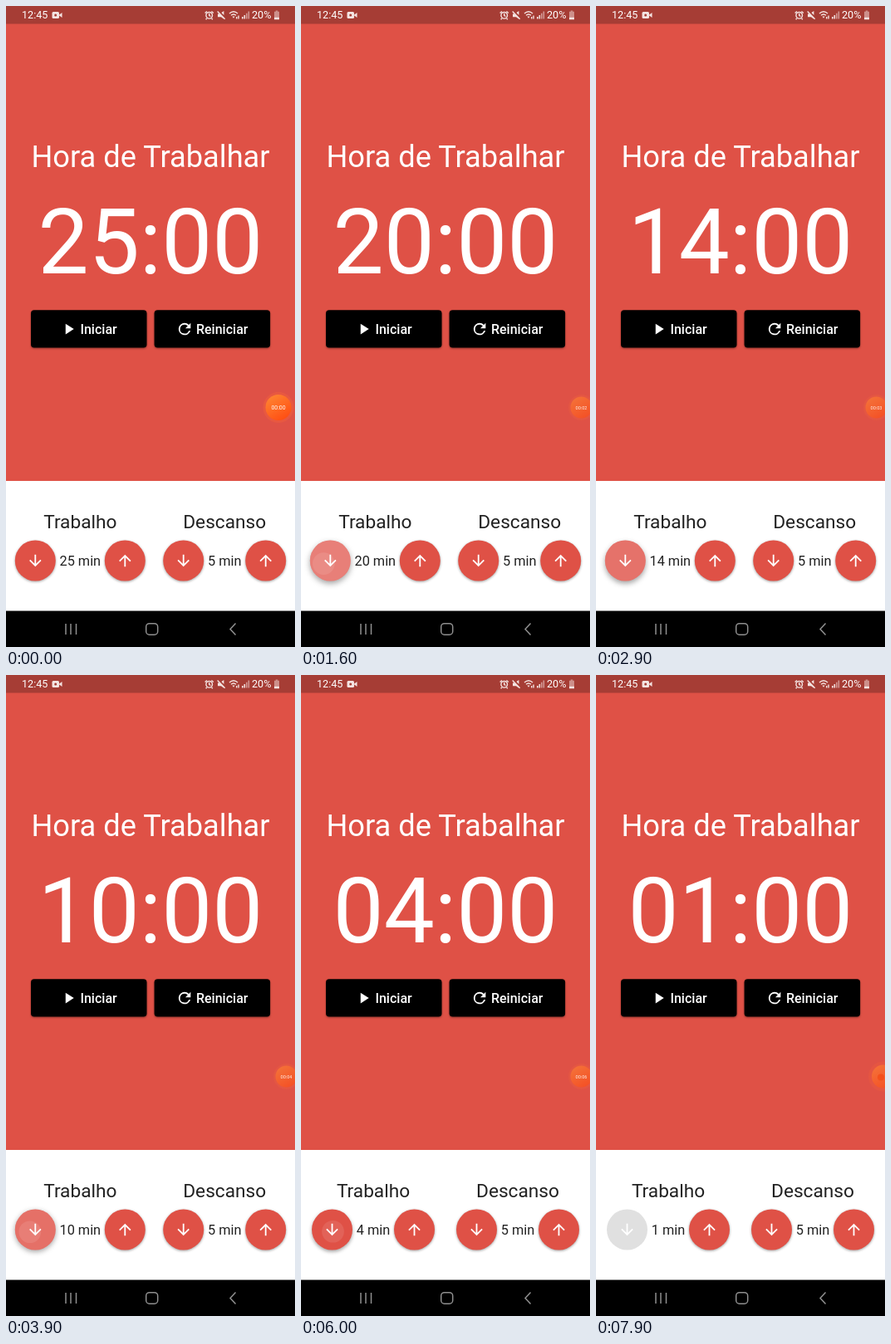
An HTML page for the animation above (8000 ms loop, 348 px wide and 772 px high).

```html
<!DOCTYPE html>
<html lang="pt">
<head>
<meta charset="utf-8">
<title>Hora de Trabalhar</title>
<style>
  html, body { margin: 0; width: 100%; height: 100%; overflow: hidden; background: #000; }
  svg { display: block; width: 100%; height: 100%; }
  text { font-family: Roboto, "Open Sans", sans-serif; fill: #fff; }
  .mid { text-anchor: middle; }
  .dark text { fill: #212121; text-anchor: middle; font-size: 16.31px; }
  .dark .head { font-size: 22.66px; }
  .btn { font-size: 16px; font-weight: 500; }
  .card { filter: drop-shadow(0 1.5px 1px rgba(0, 0, 0, .38)); }
  .disc { fill: #df5146; filter: drop-shadow(0 1.5px 1.4px rgba(0, 0, 0, .38)); }
  .nav { fill: none; stroke: #8f8f8f; stroke-width: 1.5; }
</style>
</head>
<body>
<svg viewBox="0 0 348 772">
  <defs>
    <linearGradient id="orange" x1="0" y1="0" x2=".6" y2="1">
      <stop offset="0" stop-color="#ff8a35"/>
      <stop offset="1" stop-color="#ff5014"/>
    </linearGradient>
    <clipPath id="round"><circle r="24.5"/></clipPath>
    <path id="down" d="M20 12l-1.41-1.41L13 16.17V4h-2v12.17l-5.58-5.59L4 12l8 8 8-8z"
      transform="scale(.906) translate(-12 -12)"/>
  </defs>

  <rect width="348" height="573" fill="#df5146"/>
  <rect width="348" height="21.5" fill="#a63d35"/>

  <g fill="#f4e4e2">
    <text x="19" y="15.4" font-size="12.6">12:45</text>
    <rect x="55.5" y="7" width="8.5" height="8" rx="1.5"/>
    <path d="M63.5 11l4-3v6z"/>
    <circle cx="59.7" cy="11" r="1.5" fill="#a63d35"/>
    <g fill="none" stroke="#f4e4e2" stroke-width="1.4">
      <circle cx="244.7" cy="11.3" r="3.8"/>
      <path d="M244.7 9v2.5l1.8 1M239.6 8.6l2.4-2.2M249.8 8.6l-2.4-2.2M241.8 15l-1.2 1.3M247.6 15l1.2 1.3"/>
      <path d="M254.6 6.4l9 9.4"/>
      <path d="M269 9q5-4.6 10 0M271 11.3q3-2.6 6 0"/>
    </g>
    <path d="M255 9.4h2.4l5 5.4v1l-3.4-2.6H255zM259.4 8l3-2v5z"/>
    <path d="M272.4 12.6h3.2L274 14.8zM277 13h1.4v2.6H277zM279.3 11.6h1.4v4h-1.4z"/>
    <path d="M284 13h1.6v2.6H284zM286.5 11h1.6v4.6h-1.6z"/>
    <path d="M289 8.7h1.6v6.9H289zM291.5 6.5h1.6v9.1h-1.6z" opacity=".55"/>
    <text x="296" y="15.4" font-size="12.6">20%</text>
    <path d="M324.7 5.6h2.6v1.2h1.7v9.4h-6V6.8h1.7z" opacity=".5"/>
    <path d="M323 13.8h6v2.4h-6z"/>
  </g>

  <text class="mid" x="174" y="194" font-size="36.25">Hora de Trabalhar</text>
  <text class="mid" id="clock" x="174" y="321.6" font-size="108.75">25:00</text>

  <g class="card">
    <rect x="30" y="366.3" width="139.5" height="45.3" rx="4"/>
    <rect x="178.6" y="366.3" width="139.5" height="45.3" rx="4"/>
  </g>
  <g fill="#fff">
    <path transform="translate(64.5 378.2) scale(.906)" d="M8 5v14l11-7z"/>
    <path transform="translate(204.2 378.2) scale(.906)" d="M17.65 6.35A7.96 7.96 0 0 0 12 4a8 8 0 1 0 7.73 10h-2.08A6 6 0 1 1 12 6c1.66 0 3.14.69 4.22 1.78L13 11h7V4z"/>
  </g>
  <text class="btn" x="89.4" y="394.7">Iniciar</text>
  <text class="btn" x="229" y="394.7">Reiniciar</text>

  <g id="badge">
    <circle id="halo" fill="#f0603c"/>
    <circle id="ball" fill="url(#orange)"/>
    <circle id="dot" r="4" cy="1" cx="-3" fill="#f4501c"/>
    <text class="mid" id="count">00:00</text>
  </g>

  <rect y="572" width="348" height="157" fill="#fff"/>
  <g class="dark" id="panel"></g>

  <rect y="728.5" width="348" height="43.5"/>
  <path class="nav" d="M72 744v13M78 744v13M84.500 744v13M276.500 743.500l-6.500 7 6.500 7"/>
  <rect class="nav" x="168.700" y="743.700" width="14" height="13.500" rx="4"/>
</svg>

<script>
const LOOP = 8000;
const START = 25;
// moments at which each tap takes one minute off
const TAPS = [
  800, 980, 1150, 1330, 1500, 1700, 1900, 2120, 2330, 2550, 2760, 3050,
  3250, 3500, 3750, 4000, 4300, 4600, 4900, 5300, 5650, 6100, 6500, 6870
];
const HOLD = 130;
const TICKS = [200, 1200, 2200, 3200, 4300, 5300, 6300];
// time, x, ball radius, halo radius, opacity, label size, label opacity
const BADGE = [
  [0, 328, 15.5, 18.5, 1, 6.9, 1],
  [900, 328, 15.5, 18.5, 1, 6.9, 1],
  [1250, 337.5, 13, 15.5, .6, 5.6, 1],
  [6450, 337.5, 13, 15.5, .6, 5.6, 1],
  [6750, 346, 14, 18, .6, 5.6, 0],
  [LOOP, 346, 14, 18, .6, 5.6, 0]
];
const NS = 'http://www.w3.org/2000/svg';
const $ = id => document.getElementById(id);
const clamp = v => Math.max(0, Math.min(1, v));
const ease = v => 1 - (1 - clamp(v)) ** 2;
const mix = (a, b, k) => a + (b - a) * k;
const pad = n => String(n).padStart(2, '0');
const passed = (list, t) => list.filter(x => x <= t).length;

function add(parent, tag, attrs = {}, text = '') {
  const el = document.createElementNS(NS, tag);
  for (const k in attrs) el.setAttribute(k, attrs[k]);
  el.textContent = text;
  parent.append(el);
  return el;
}

function set(el, attrs) {
  for (const k in attrs) el.setAttribute(k, attrs[k]);
}

function makeButton(parent, up) {
  const g = add(parent, 'g');
  const disc = add(g, 'circle', { r: 24.5, class: 'disc' });
  const ink = add(g, 'g', { 'clip-path': 'url(#round)' });
  const turn = up ? 'rotate(180)' : '';
  add(g, 'use', { href: '#down', fill: '#fff', transform: turn });
  return { g, disc, ink };
}

function makeColumn(name, minutes) {
  const g = $('panel');
  return {
    head: add(g, 'text', { y: 629.3, class: 'head' }, name),
    less: makeButton(g, false),
    label: add(g, 'text', { y: 674 }, minutes + ' min'),
    more: makeButton(g, true)
  };
}

function place(col, mid, reach) {
  col.head.setAttribute('x', mid);
  col.label.setAttribute('x', mid);
  col.less.g.setAttribute('transform', `translate(${mid - reach} 668)`);
  col.more.g.setAttribute('transform', `translate(${mid + reach} 668)`);
}

const work = makeColumn('Trabalho', START);
const rest = makeColumn('Descanso', 5);
const ripples = TAPS.map((_, i) => add(work.less.ink, 'circle', {
  fill: '#fff', cx: -8 + 9 * clamp((i - 14) / 6), cy: 4 - i / 12
}));

function drawPress(t) {
  let lift = 0;
  TAPS.forEach((tap, i) => {
    const age = t - tap + HOLD;
    const fade = 1 - clamp((t - tap - 100) / 200);
    const live = age > 0 && fade > 0;
    set(ripples[i], {
      r: live ? 9 + 42 * ease((age - 15) / 300) : 0,
      opacity: live ? .24 * clamp(age / 75) * fade : 0
    });
    if (live) lift = Math.max(lift, clamp(age / 80) * fade);
  });
  const off = clamp((t - 6900) / 200);
  const rgb = [[223, 224], [81, 224], [70, 224]].map(c => Math.round(mix(...c, off)));
  const { style } = work.less.disc;
  style.fill = `rgb(${rgb})`;
  const drop = 1.5 + 2 * lift;
  style.filter = `drop-shadow(0 ${drop}px ${drop}px rgba(0,0,0,${.36 * (1 - off)}))`;
}

function drawBadge(t) {
  const i = BADGE.findIndex(k => k[0] > t);
  const a = BADGE[i - 1], b = BADGE[i];
  const k = ease((t - a[0]) / (b[0] - a[0]));
  const [, x, ball, halo, alpha, size, label] = a.map((v, n) => mix(v, b[n], k));
  set($('badge'), { transform: `translate(${x} 483.5)` });
  set($('halo'), { r: halo, opacity: .55 * alpha });
  set($('ball'), { r: ball, opacity: alpha });
  set($('dot'), { opacity: 1 - label });
  set($('count'), { 'font-size': size, y: size * .36, opacity: label * mix(.75, 1, alpha) });
  $('count').textContent = '00:' + pad(passed(TICKS, t));
}

function draw(t) {
  const left = START - passed(TAPS, t);
  $('clock').textContent = pad(left) + ':00';
  work.label.textContent = left + ' min';
  const wide = left > 9;
  place(work, wide ? 89.3 : 87, wide ? 54 : 49.5);
  place(rest, wide ? 263.2 : 261, 49.5);
  drawPress(t);
  drawBadge(t);
}

const begin = performance.now();
function frame() {
  draw((performance.now() - begin) % LOOP);
  requestAnimationFrame(frame);
}
frame();
</script>
</body>
</html>
```
